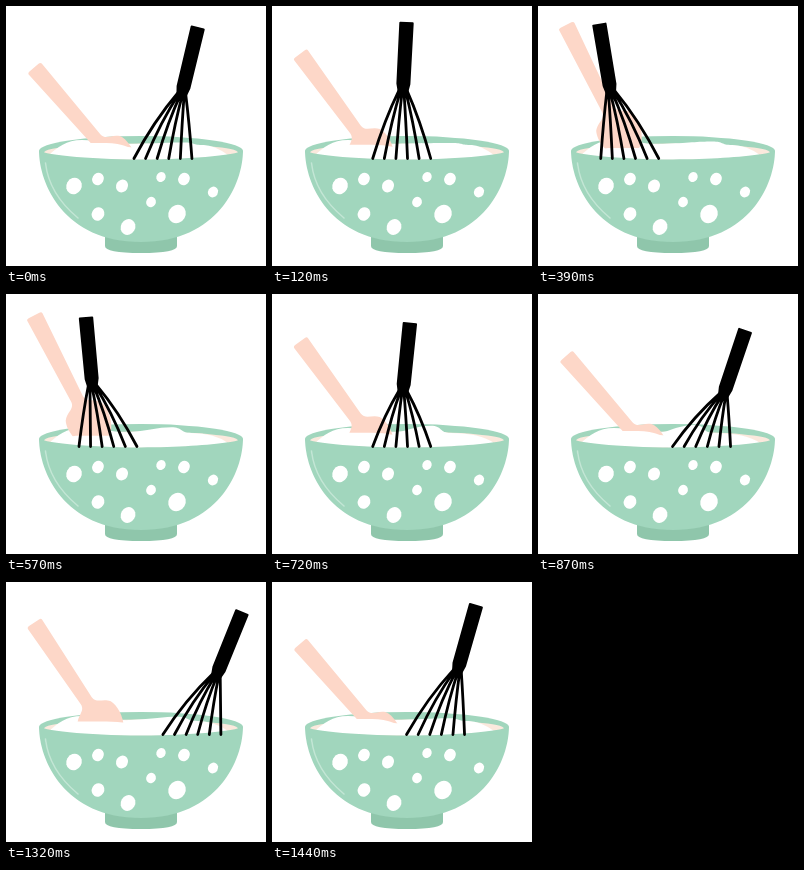
An HTML page for the animation above (1470 ms loop, 260 by 260 pixels).

```html
<!DOCTYPE html>
<html lang="en">
<head>
<meta charset="utf-8">
<title>Mixing bowl</title>
<style>
  html, body { margin: 0; width: 100%; height: 100%; overflow: hidden; background: #fff; }
  svg { display: block; width: 100vw; height: 100vh; }
</style>
</head>
<body>
<svg viewBox="0 0 260 260">
  <defs>
    <clipPath id="mouth"><path d="M0 0H260V147H232C218 151 180 153.500 135 153.500S52 152 38 147H0Z"/></clipPath>
  </defs>
  <ellipse cx="135" cy="145" rx="102" ry="15" fill="#a1d6bd"/>
  <ellipse cx="135" cy="146.500" rx="97" ry="9" fill="#fbe9dd"/>
  <g clip-path="url(#mouth)">
    <path id="cream" fill="#fff"/>
    <path id="spoon" fill="#fdd7c8" d="M-8.500 2Q-8.500 0 -6 0H6Q8.500 0 8.500 2L6.500 94C7 102 15 101 20 108C25 118 20 146 0 146S-25 118 -20 108C-15 101 -7 102 -6.500 94Z"/>
    <path id="front" fill="#fff"/>
  </g>
  <path d="M99 230H171V240Q171 247 135 247T99 240Z" fill="#8fc6ab"/>
  <path d="M33 144C33 148 80 153.500 135 153.500S237 148 237 144C237 178 212 236 135 236S33 178 33 144Z" fill="#a1d6bd"/>
  <path d="M39.500 157Q43 188 72 212" fill="none" stroke="#c3e6d5" stroke-width="1.500" stroke-linecap="round"/>
  <g id="dots" fill="#fff"></g>
  <path id="wires" fill="none" stroke="#000" stroke-width="2.800" stroke-linecap="round"/>
  <path id="grip" stroke="#000" stroke-width="2" stroke-linejoin="round"/>
</svg>
<script>
const LOOP = 1470, STEP = 30, TAU = Math.PI * 2;
const el = id => document.getElementById(id);
const { sin, cos } = Math;

// The spoon dips and lifts twice per loop: [time, height of its end].
const strokes = [[-20, 62], [340, 19], [520, 19], [850, 62], [870, 62], [1200, 22], [1450, 62], [1810, 19]];

function spoonY(t) {
  const i = strokes.findIndex(s => s[0] > t);
  const [t0, y0] = strokes[i - 1], [t1, y1] = strokes[i];
  return y0 + (y1 - y0) * (1 - cos(Math.PI * (t - t0) / (t1 - t0))) / 2;
}

// The whisk circles the bowl; a is 0 at its far right.
function drawWhisk(a) {
  const nx = 151 + 77 * cos(a) - 6 * cos(2 * a) - 4 * cos(3 * a);
  const ny = 92 + 6.5 * cos(a) - 6.5 * sin(a);
  const lean = (9 + 18 * cos(a) - 1.5 * sin(a) - 1.5 * cos(2 * a) - cos(3 * a)) * TAU / 360;
  const mid = 145 + 53.7 * cos(a);
  const at = (up, side) => [
    nx + up * sin(lean) + side * cos(lean),
    ny - up * cos(lean) + side * sin(lean)
  ];
  el("grip").setAttribute("d", "M" + [
    at(67, -6.2), at(67, 6.2), at(6, 6), at(-3, 4), at(-3, -4), at(6, -6)
  ].join("L") + "Z");

  let d = "";
  for (let i = -2.5; i <= 2.5; i++) {
    const [x, y] = at(0, i * 1.5);
    const dx = mid + i * 11.6 - x, dy = 152.5 - y;
    d += `M${x} ${y}q${dx * .56} ${dy * .44} ${dx} ${dy}`;
  }
  el("wires").setAttribute("d", d);
}

function drawSpoon(t) {
  const y = spoonY(t), top = 142 - 5 * (y - 19) / 43;
  el("spoon").setAttribute("transform", `translate(28 ${y}) rotate(${-20 - .34 * y})`);
  el("front").setAttribute("d",
    `M42 150Q52 ${top + 2} 70 ${top}H100Q112 ${top} 122 141Q165 145 215 149V158H42Z`);
}

function drawCream(t) {
  const sway = cos(TAU * (t - 150) / LOOP);
  const x = 168 + 12 * sway, y = 134 + 3 * sway;
  el("cream").setAttribute("d",
    `M42 150C52 141 60 134 76 134C94 134 108 139 125 138` +
    `C${x - 24} 137 ${x - 14} ${y} ${x} ${y}` +
    `C${x + 12} ${y} ${x + 8} 139 ${x + 20} 139Q208 139 222 149V158H42Z`);
}

function draw(t) {
  drawCream(t);
  drawSpoon(t);
  drawWhisk(TAU * (t - 1155) / LOOP);
}

const dots = [
  [68, 180, 8], [92, 173, 6], [116, 180, 6.2], [155, 171, 4.8], [178, 173, 6],
  [207, 186, 5.2], [145, 196, 5], [92, 208, 6.5], [122, 221, 7.6], [171, 208, 9]
];
el("dots").innerHTML = dots.map(([x, y, r]) =>
  `<ellipse rx="${r * .95}" ry="${r * 1.06}" transform="translate(${x} ${y}) rotate(30)"/>`).join("");

const start = performance.now();
function tick() {
  const t = (performance.now() - start) % LOOP;
  draw(Math.floor(t / STEP) * STEP);
  requestAnimationFrame(tick);
}
tick();
</script>
</body>
</html>
```
